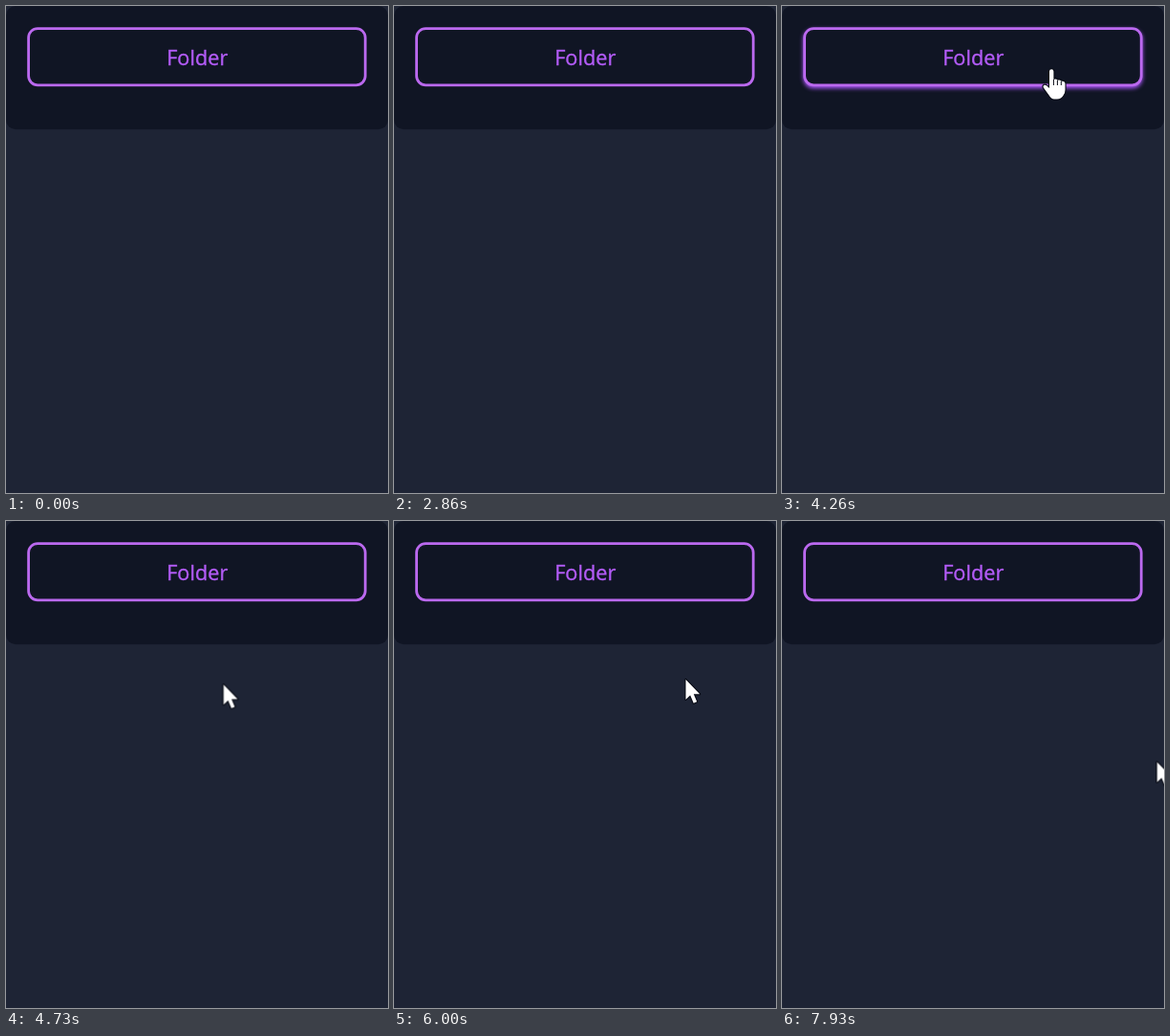
These frames come from a looping animation (400x510 px, 8 s). An HTML page:

```html
<!DOCTYPE html>
<html lang="en">
<head>
<meta charset="utf-8">
<title>Folder button</title>
<style>
  html, body {
    margin: 0;
    width: 100%;
    height: 100%;
    overflow: hidden;
    background: #1e2435;
  }
  .stage {
    display: block;
    width: 400px;
    height: 510px;
  }
  .panel { fill: #101524; }
  .button {
    fill: #101524;
    stroke: #bb69ef;
    stroke-width: 2.8;
  }
  .label {
    font: 21.7px "Open Sans", "Noto Sans", sans-serif;
    fill: #b45cf8;
    stroke: #b45cf8;
    stroke-width: .35;
    text-anchor: middle;
  }
  .cursor {
    fill: #fff;
    stroke: #070a14;
    stroke-width: 2.2;
    stroke-linejoin: round;
    paint-order: stroke;
  }
  .slits { fill: none; stroke-width: 1; }

  /* 120 ticks per loop; the small lead keeps ticks ahead of rounding */
  .button, .cursor, .arrow, .hand {
    animation: 8s -7ms infinite both;
  }
  .button { animation-name: glow; animation-timing-function: linear; }
  .cursor { animation-name: travel; animation-timing-function: step-end; }
  .arrow { animation-name: arrow; animation-timing-function: step-end; }
  .hand { animation-name: hand; animation-timing-function: step-end; }

  @keyframes glow {
    0%, 51.67%, 59.17%, 100% { filter: drop-shadow(0 2px 2px #a855f700); }
    53.2%, 56.67% { filter: drop-shadow(0 2px 2px #a855f7); }
  }
  @keyframes arrow {
    0%, 56.67% { opacity: 1; }
    51.67% { opacity: 0; }
  }
  @keyframes hand {
    0%, 56.67% { opacity: 0; }
    51.67% { opacity: 1; }
  }
  @keyframes travel {
    0% { translate: -40px -40px; }
    /* enter from the left and settle on the button */
    38.33% { translate: 33px 336px; }
    39.17% { translate: 93px 300px; }
    40% { translate: 140px 268px; }
    40.83% { translate: 224px 232px; animation-timing-function: steps(5); }
    45% { translate: 300px 130px; animation-timing-function: steps(8); }
    51.67% { translate: 284px 74px; animation-timing-function: steps(2); }
    53.33% { translate: 282px 66px; }
    /* leave the button and rest below it */
    55.83% { translate: 282px 66px; animation-timing-function: steps(3); }
    58.33% { translate: 235px 184px; animation-timing-function: steps(3); }
    60.83% { translate: 212px 143px; }
    /* wide sweep */
    73.33% { translate: 250px 110px; }
    74.17% { translate: 330px 82px; }
    75% { translate: 305px 165px; }
    75.83% { translate: 190px 215px; }
    76.67% { translate: 70px 260px; }
    77.5% { translate: 27px 320px; }
    78.33% { translate: 75px 385px; }
    79.17% { translate: 145px 421px; }
    80% { translate: 190px 421px; }
    80.83% { translate: 191px 382px; }
    /* out to the right, then a glimpse at the edge */
    87.5% { translate: 210px 378px; }
    88.33% { translate: 243px 362px; }
    89.17% { translate: 292px 328px; }
    90% { translate: 330px 308px; animation-timing-function: steps(2); }
    91.67% { translate: 380px 289px; }
    92.5% { translate: 440px 270px; }
    98.33% { translate: 392px 229px; }
    99.17%, 100% { translate: 392.3px 251.5px; }
  }
</style>
</head>
<body>
<svg class="stage" width="400" height="510" viewBox="0 0 400 510">
  <rect class="panel" width="400" height="129.3" rx="10"/>
  <rect class="button" x="23.6" y="23.6" width="352.6" height="59.2" rx="9.5"/>
  <text class="label" x="200.2" y="62">Folder</text>
  <g class="cursor">
    <path class="arrow" d="M.5 1V22L5.2 17.6 8.7 25.8 12.2 24.3 8.8 16.3H15.2Z"/>
    <g class="hand">
      <path d="M-2 2.5a2.2 2.2 0 0 1 4.4 0V11q2.6-1.4 4 .8 2.7-1 3.9 1 4.2-.6 4.2 3v6q0 3.5-2 6-2 3.6-6.5 3.6h-3q-3.2 0-5.2-3.6L-8.2 19.6q-1-2 .8-2.9 2-.5 5.4 3.4Z"/>
      <path class="slits" d="M2.4 11v6M6.4 12v5M10.3 13v4"/>
    </g>
  </g>
</svg>
</body>
</html>
```
